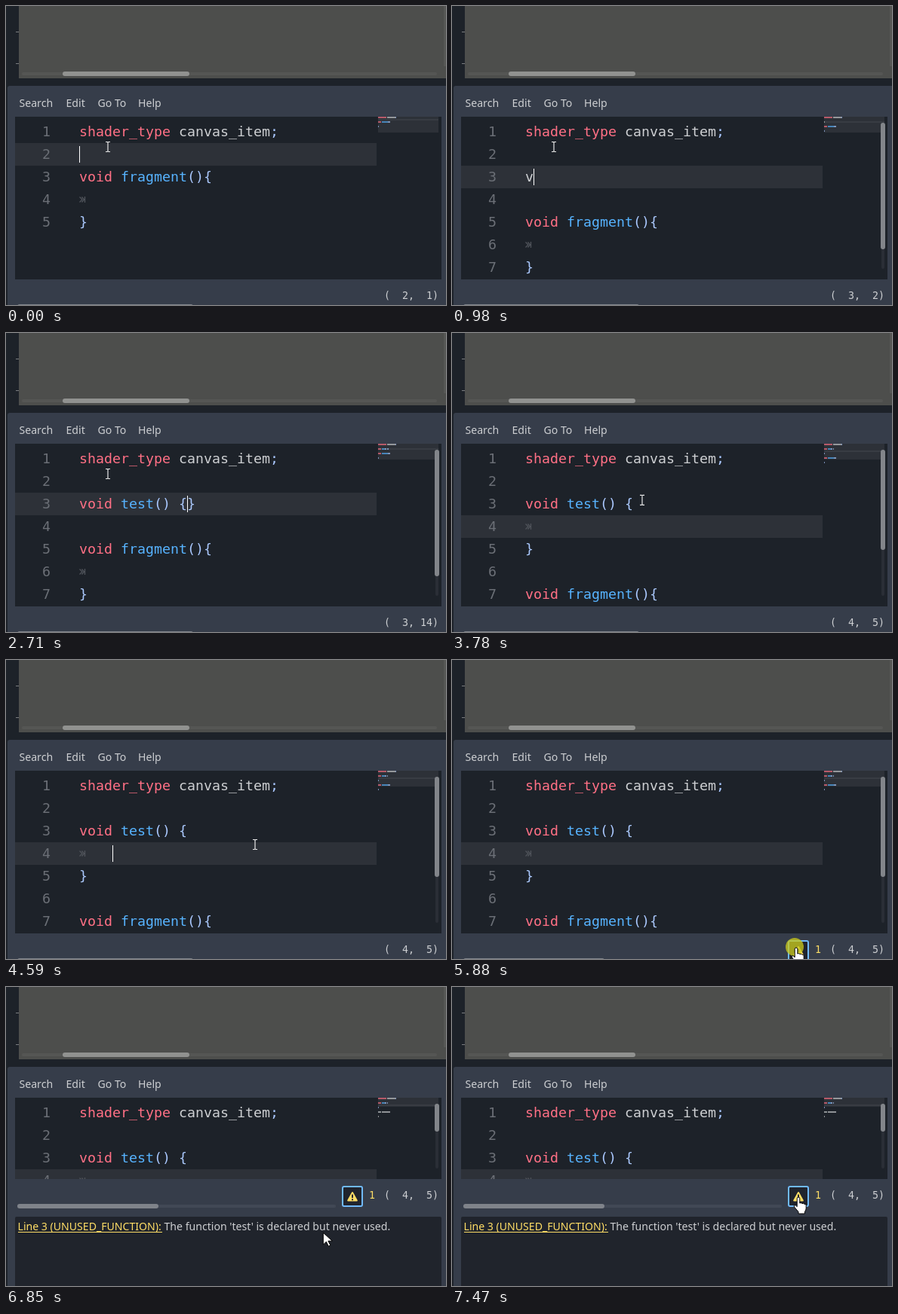
These frames come from a looping animation (583 px wide and 397 px high, 8 s). An HTML page:

```html
<!DOCTYPE html>
<html lang="en">
<head>
<meta charset="utf-8">
<title>Shader editor</title>
<style>
html, body { margin: 0; width: 100%; height: 100%; overflow: hidden; background: #1d2229; }
svg { display: block; width: 583px; height: 397px; }
text { white-space: pre; }
.ui { font: 14.1px "Noto Sans", "Open Sans", sans-serif; fill: #cdcfd2; }
.code { font: 18.27px "DejaVu Sans Mono", "Noto Sans Mono", monospace; font-variant-ligatures: none; }
.pos { font: 13.29px "DejaVu Sans Mono", "Noto Sans Mono", monospace; fill: #cdcfd2; }
.warn { fill: #ffde66; }
.num { fill: #6b6f76; }
.tab { fill: none; stroke: #50545b; stroke-width: 1.3; }
.cur { fill: #fff; stroke: #000; stroke-width: 1; stroke-linejoin: round; }
</style>
</head>
<body>
<svg viewBox="0 0 583 397">
  <defs>
    <clipPath id="view"><rect id="clip" x="12" y="147" width="565" height="216"/></clipPath>
  </defs>
  <!-- canvas viewport -->
  <path fill="#4d4e4c" d="M17 0H583V96H17z"/>
  <path fill="#7b7d80" d="M13 34h4v1h-4zM13 76h4v1h-4z"/>
  <rect x="580" width="3" height="80" fill="#565755"/>
  <rect x="21" y="88" width="550" height="4" rx="2" fill="#555654"/>
  <rect x="75" y="87" width="168" height="6" rx="3" fill="#919290"/>
  <!-- editor panel -->
  <path fill="#363d4a" d="M2 397V109a3 3 0 0 1 3-3H583V397z"/>
  <g class="ui">
    <text x="17.5" y="134">Search</text>
    <text x="79.5" y="134">Edit</text>
    <text x="121.5" y="134">Go To</text>
    <text x="175" y="134">Help</text>
  </g>
  <g clip-path="url(#view)">
    <rect x="12" y="147" width="565" height="250" fill="#1d2229"/>
    <g id="lines" class="code"></g>
    <g id="map"></g>
    <g id="bar">
      <rect id="track" x="569" y="155" width="4" height="194" rx="2" fill="#2a2e36"/>
      <rect id="thumb" x="568" y="155" width="6" height="168" rx="3" fill="#82858a"/>
    </g>
  </g>
  <g id="foot">
    <rect id="htrack" x="15" y="397" width="471" height="4" rx="2" fill="#414855"/>
    <rect id="hthumb" x="15" y="396" width="233" height="6" rx="3" fill="#7f838a"/>
    <g id="alert">
      <rect id="focus" x="446" y="373" width="26" height="26" rx="2" fill="#20242d" stroke="#70bafa" stroke-width="2"/>
      <path class="warn" stroke="#ffde66" stroke-width="2" stroke-linejoin="round" d="M459 381l5.8 10.5h-11.6z"/>
      <path fill="#252932" d="M458 383.5h2v4.5h-2zM458 389.2h2v2h-2z"/>
      <text class="pos warn" x="481" y="389" style="fill:#ffde66">1</text>
    </g>
    <text id="pos" class="pos" x="501" y="389"></text>
  </g>
  <g id="output">
    <path fill="#20242c" d="M12 397V307a2 2 0 0 1 2-2H575a2 2 0 0 1 2 2V397z"/>
    <text class="ui" x="15.5" y="323" style="fill:#ffde66">Line 3 (UNUSED_FUNCTION):</text>
    <rect x="16" y="325" width="191" height="1" fill="#ffde66"/>
    <text class="ui" x="209.5" y="323">The function 'test' is declared but never used.</text>
    <rect id="grip" x="263" y="300" width="62" height="2" rx="1" fill="#8d9199"/>
  </g>
  <circle id="click" cx="454" cy="381" r="12" fill="#c8c81e" fill-opacity=".78"/>
  <g id="mouse">
    <path id="beam" fill="none" stroke="#e8e8e8" stroke-width="1.2" d="M-3 -6.5h2.2l.8.8.8-.8H3M0 -6V6M-3 6.5h2.2l.8-.8.8.8H3"/>
    <path id="arrow" class="cur" d="M0 0V16l4-4 3 6 2.6-1.2-3-5.8h5.4z"/>
    <path id="size" class="cur" d="M0 -11l4.5 5.5H1.3v11H4.5L0 11l-4.5-5.5h3.2v-11h-3.2z"/>
    <path id="hand" class="cur" d="M-1.8 11V1.8a1.8 1.8 0 0 1 3.6 0V8q1.8-1 3.2.5 1.9-.7 2.9.7 2-.4 2.3 1.6V15q0 2-1.8 4.500V22H0v-2.500l-5.500-6.500q-.9-1.800.6-2.300 1.300-.2 3.100 2z"/>
  </g>
</svg>
<script>
const $ = id => document.getElementById(id);
const LOOP = 8000, CW = 11, LH = 30, TOP = 152, LEFT = 97;
const WARN = 4920, PRESS = 5830, OPEN = 5950;
const WORD = 'void test';
const strokes = [980, 1110, 1240, 1310, 1440, 1570, 1700, 1830, 1960];
const COLORS = { kw: '#ff7085', fn: '#57b3ff', sym: '#abc9ff', txt: '#cdcfd2' };

// pointer waypoints: time, x, y
const path = [
  [0, 135, 187], [3575, 135, 187], [3900, 330, 245], [4615, 330, 245],
  [5070, 395, 300], [5230, 395, 300], [5780, 456, 382], [6110, 456, 382],
  [6270, 203, 301], [6320, 203, 301], [6500, 72, 317], [6890, 490, 328],
  [6960, 528, 346], [7400, 459, 279], [LOOP, 459, 279]
];

function pointer(t) {
  const q = Math.floor(t / 65) * 65;
  let i = 1;
  while (path[i][0] <= q && i < path.length - 1) i++;
  const [a, x, y] = path[i - 1], [b, u, v] = path[i];
  const k = (q - a) / (b - a);
  return [x + (u - x) * k, y + (v - y) * k];
}

function documentAt(t) {
  const head = ['shader_type canvas_item;', ''];
  const tail = ['void fragment(){', '\t', '}'];
  if (t < 390) return { lines: [...head, ...tail], row: 2, col: 1 };
  if (t < 520) return { lines: [...head, '', ...tail], row: 3, col: 1 };
  if (t < 650) return { lines: [...head, '', '', ...tail], row: 4, col: 1 };
  if (t >= 2910) return { lines: [...head, 'void test() {', '\t', '}', '', ...tail], row: 4, col: 5 };
  let n = strokes.filter(s => s <= t).length, text = WORD.slice(0, n);
  if (t >= 2160) { text = WORD + '()'; n = 10; }
  if (t >= 2290) n = 11;
  if (t >= 2510) { text += ' '; n = 12; }
  if (t >= 2710) { text += '{}'; n = 13; }
  return { lines: [...head, text, '', ...tail], row: 3, col: n + 1 };
}

function tokens(line) {
  const out = [];
  for (const m of line.matchAll(/\w+|[(){};]/g)) {
    const s = m[0];
    const kind = /^(void|shader_type)$/.test(s) ? 'kw'
      : /\W/.test(s) ? 'sym'
      : line[m.index + s.length] === '(' ? 'fn' : 'txt';
    out.push({ s, at: m.index, color: COLORS[kind] });
  }
  return out;
}

const rect = (x, y, w, h, fill) =>
  `<rect x="${x}" y="${y}" width="${w}" height="${h}" fill="${fill}"/>`;

function scrollAt(t) {
  if (t < 3900 || t > 4330) return 0;
  const q = Math.floor((t - 3900) / 70) * 70;
  return 2 * Math.sin(Math.PI * q / 430);
}

function caretOn(t) {
  if (t >= PRESS) return false;
  return t < 3440 || Math.floor((t - 3440) / 650) % 2 === 1;
}

function drawCode(doc, t, scroll) {
  let s = rect(12, TOP + (doc.row - 1 - scroll) * LH, 479, LH, '#2d3138');
  doc.lines.forEach((line, i) => {
    const y = TOP + (i - scroll) * LH, base = y + 21;
    s += `<text class="num" x="48" y="${base}">${i + 1}</text>`;
    if (line === '\t') s += `<path class="tab" d="M97.500 ${y + 11.5}l3.500 3.500-3.500 3.500M104.500 ${y + 11}v8M100.500 ${y + 11.5}l3 3.500-3 3.500"/>`;
    for (const k of tokens(line))
      s += `<text x="${LEFT + k.at * CW}" y="${base}" fill="${k.color}">${k.s}</text>`;
  });
  if (caretOn(t))
    s += rect(LEFT + (doc.col - 1) * CW, TOP + 4 + (doc.row - 1 - scroll) * LH, 1, 22, '#fff');
  return s;
}

function drawMap(doc, open, scroll) {
  let s = rect(493, 147 + 3 * scroll, 80, open ? 12 : 21, '#2d3138');
  s += rect(493, 144 + 3 * doc.row, 80, 2, '#383c43');
  doc.lines.forEach((line, i) => {
    for (const k of tokens(line)) {
      const color = open && i > 5 ? COLORS.txt : k.color;
      s += `<rect x="${493 + k.at}" y="${147 + 3 * i}" width="${k.s.length}" height="2" fill="${color}" opacity=".65"/>`;
    }
  });
  return s;
}

const set = (id, attrs) => { for (const a in attrs) $(id).setAttribute(a, attrs[a]); };
const show = (id, on) => { $(id).style.display = on ? '' : 'none'; };
const cache = {};
function fill(id, html) {
  if (cache[id] !== html) $(id).innerHTML = cache[id] = html;
}

function cursorKind(x, y, t) {
  const open = t >= OPEN, buttonY = open ? 264 : 372;
  if (t >= WARN && x > 444 && x < 474 && y > buttonY && y < buttonY + 28) return 'hand';
  if (open && y > 295 && y < 306) return 'size';
  if (open && x > 15 && x < 207 && y > 308 && y < 328) return 'hand';
  return y > 147 && y < (open ? 255 : 363) && x < 491 ? 'beam' : 'arrow';
}

function draw(t) {
  const doc = documentAt(t), open = t >= OPEN, warned = t >= WARN, scroll = scrollAt(t);
  fill('lines', drawCode(doc, t, scroll));
  fill('map', drawMap(doc, open, scroll));
  fill('pos', `(${String(doc.row).padStart(3)},${String(doc.col).padStart(3)})`);

  const n = doc.lines.length;
  show('bar', n > 6);
  set('track', { height: open ? 86 : 194 });
  set('thumb', { y: 155 + scroll * 20, height: open ? 37 : n > 7 ? 133 : 168 });
  set('clip', { height: open ? 108 : 216 });
  set('foot', { transform: `translate(0 ${open ? -108 : 0})` });
  set('htrack', { width: warned ? 422 : 471 });
  set('hthumb', { width: warned ? 187 : 233 });
  show('alert', warned);
  show('focus', t >= PRESS);
  show('output', open);

  const [x, y] = pointer(t), kind = cursorKind(x, y, t);
  show('grip', kind === 'size');
  show('click', t >= PRESS && !open);
  set('mouse', { transform: `translate(${x.toFixed(1)} ${y.toFixed(1)})` });
  for (const k of ['beam', 'arrow', 'size', 'hand']) show(k, k === kind);
}

const start = performance.now();
function tick() {
  draw((performance.now() - start) % LOOP);
  requestAnimationFrame(tick);
}
tick();
</script>
</body>
</html>
```
